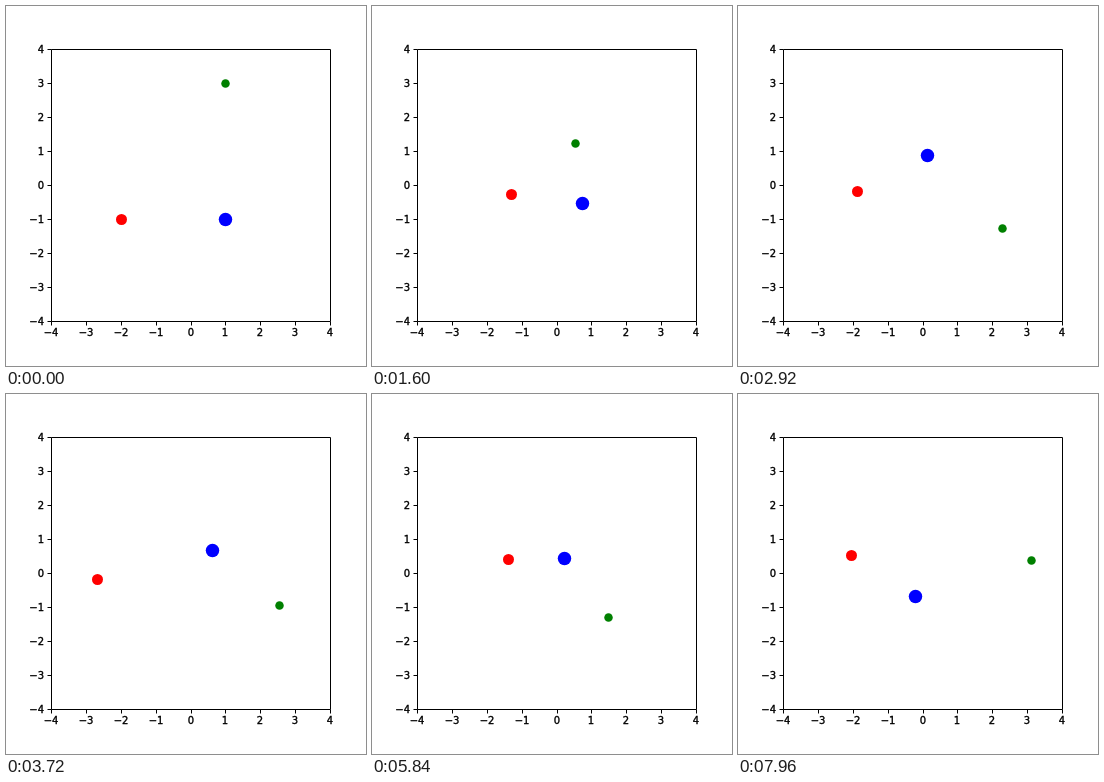
These frames come from a looping animation (360x360 px, 8000 ms). An HTML page:

```html
<!DOCTYPE html>
<html>
<head>
<meta charset="utf-8">
<style>
html, body { margin: 0; height: 100%; overflow: hidden; background: #fff; }
svg { display: block; width: 360px; height: 360px; }
text { font: 10px "DejaVu Sans", sans-serif; stroke: #000; stroke-width: .35px; }
.axes { fill: none; stroke: #000; }
</style>
</head>
<body>
<svg id="plot" viewBox="0 0 360 360"></svg>
<script>
const FRAME_MS = 40, FRAMES = 200, TIME_STEP = 0.0625;
const plot = document.getElementById('plot');
const toX = x => Math.round(45 + (x + 4) * 34.875) + 0.5;
const toY = y => Math.round(315 - (y + 4) * 33.975) + 0.5;

function add(tag, attrs, text = '') {
  const el = document.createElementNS('http://www.w3.org/2000/svg', tag);
  for (const key in attrs) el.setAttribute(key, attrs[key]);
  el.textContent = text;
  return plot.appendChild(el);
}

// Axes
let path = 'M45.5 43.5H324.5V315.5H45.5Z';
for (let v = -4; v <= 4; v++) {
  const label = String(v).replace('-', '\u2212'), x = toX(v), y = toY(v);
  path += `M${x} 315.5v4M45.5 ${y}h-4`;
  add('text', { x: x - 0.5, y: 330, 'text-anchor': 'middle' }, label);
  add('text', { x: 38, y: y + 3.5, 'text-anchor': 'end' }, label);
}
add('path', { class: 'axes', d: path });

// Three bodies released from rest; state = [x, y, ...] then [vx, vy, ...]
const masses = [4, 5, 3];
const dots = ['red', 'blue', 'green'].map((fill, i) =>
  add('circle', { fill, r: (2.5 * masses[i] + 1) / 2 }));

function derivative(s) {
  const d = [...s.slice(6), 0, 0, 0, 0, 0, 0];
  for (let i = 0; i < 3; i++) for (let j = 0; j < 3; j++) {
    if (i === j) continue;
    const dx = s[2 * j] - s[2 * i], dy = s[2 * j + 1] - s[2 * i + 1];
    const pull = masses[j] / Math.hypot(dx, dy) ** 3;
    d[6 + 2 * i] += pull * dx;
    d[7 + 2 * i] += pull * dy;
  }
  return d;
}

function rungeKutta(s, h) {
  const shift = (k, f) => s.map((v, i) => v + k[i] * f);
  const a = derivative(s), b = derivative(shift(a, h / 2));
  const c = derivative(shift(b, h / 2)), d = derivative(shift(c, h));
  return s.map((v, i) => v + h / 6 * (a[i] + 2 * b[i] + 2 * c[i] + d[i]));
}

function advance(s, time) {
  while (time > 1e-12) {
    const gap = Math.min(...[[0, 2], [0, 4], [2, 4]].map(([i, j]) =>
      Math.hypot(s[i] - s[j], s[i + 1] - s[j + 1])));
    const h = Math.min(time, 0.005 * gap ** 1.5);
    s = rungeKutta(s, h);
    time -= h;
  }
  return s;
}

const states = [[-2, -1, 1, -1, 1, 3, 0, 0, 0, 0, 0, 0]];
while (states.length < FRAMES) states.push(advance(states.at(-1), TIME_STEP));

function draw() {
  const s = states[Math.floor(performance.now() / FRAME_MS) % FRAMES];
  dots.forEach((dot, i) => {
    dot.setAttribute('cx', toX(s[2 * i]));
    dot.setAttribute('cy', toY(s[2 * i + 1]));
  });
  requestAnimationFrame(draw);
}
draw();
</script>
</body>
</html>
```
